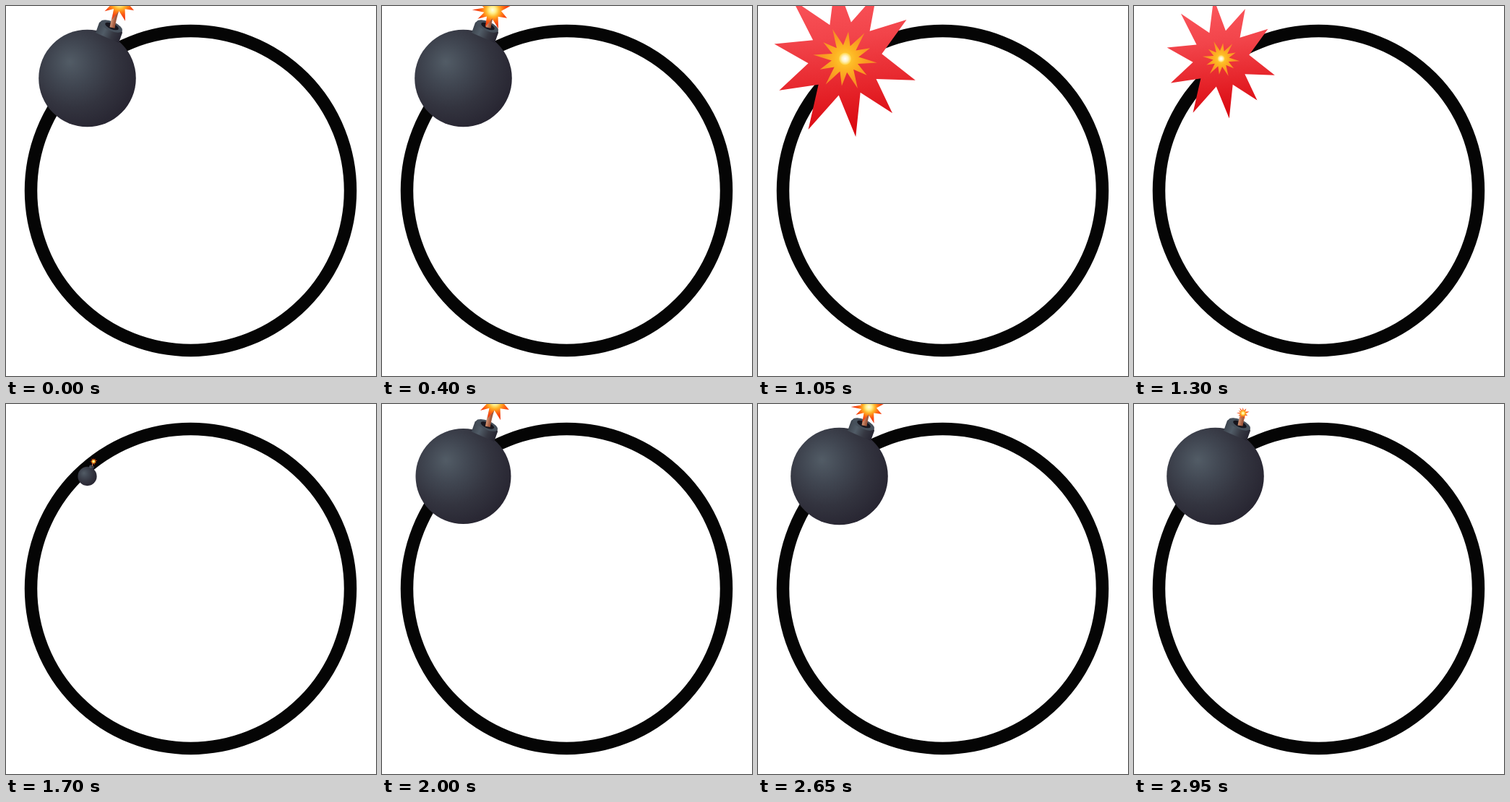
An HTML page with a canvas for the animation above (3000 ms loop, 512 by 512 pixels).

```html
<!DOCTYPE html>
<html lang="en">
<head>
<meta charset="utf-8">
<title>Bomb</title>
<style>
  html, body { margin: 0; width: 100%; height: 100%; overflow: hidden; background: #fff; }
  canvas { display: block; width: 100vw; height: 100vh; }
</style>
</head>
<body>
<canvas id="stage" width="512" height="512"></canvas>
<script>
const ctx = document.getElementById('stage').getContext('2d');
const TAU = Math.PI * 2;
const LOOP = 3000, CYCLE = 2300, STEP = 50;
const IGNITE = 800, PEAK = 950, REBIRTH = 1650, GROWTH = 400;
const BOMB = [112.5, 100], BLAST = [120.5, 73];

const clamp = x => Math.max(0, Math.min(1, x));

function polar(deg, r) {
  const a = deg * TAU / 360;
  return [Math.cos(a) * r, Math.sin(a) * r];
}

// Star from rules for the angle and reach of each tip, with a notch between tips
function star(count, angle, reach, notch) {
  const points = [];
  for (let i = 0; i < count; i++) {
    const next = i + 1 < count ? angle(i + 1) : angle(0) + 360;
    points.push(polar(angle(i), reach(i)), polar((angle(i) + next) / 2, notch));
  }
  return points;
}

const SPARK = star(10, i => 36 * i - 7 + 13 * Math.sin((i - 1) * TAU / 10), i => 25.5 + 3 * Math.cos(i * 2.6), 12);
const SHELL = star(10, i => 17 + 34.6 * i - 4 * Math.sin(i * .72), i => 80 + 5 * Math.cos((i - 2.6) * 1.6), 39);
const CORE = star(12, i => 30 * i + 7, i => i % 2 ? 22 : 26, 11);

function shaded(gradient, ...colors) {
  colors.forEach((color, i) => gradient.addColorStop(i / (colors.length - 1), color));
  return gradient;
}

const glow = (r, ...colors) => shaded(ctx.createRadialGradient(0, 0, 0, 0, 0, r), ...colors);

function polygon(points, fill) {
  ctx.beginPath();
  points.forEach(([x, y]) => ctx.lineTo(x, y));
  ctx.closePath();
  ctx.fillStyle = fill;
  ctx.fill();
}

function ellipse(x, y, rx, ry, tilt, fill) {
  ctx.beginPath();
  ctx.ellipse(x, y, rx, ry, tilt, 0, TAU);
  ctx.fillStyle = fill;
  ctx.fill();
}

function placed([x, y], scale, draw) {
  ctx.save();
  ctx.translate(x, y);
  ctx.scale(scale, scale);
  draw();
  ctx.restore();
}

function ring() {
  ctx.beginPath();
  ctx.arc(255.5, 255.5, 221, 0, TAU);
  ctx.lineWidth = 17.5;
  ctx.strokeStyle = '#050505';
  ctx.stroke();
}

function body() {
  ellipse(...BOMB, 67.3, 67.3, 0,
    shaded(ctx.createRadialGradient(88, 77, 0, 96, 84, 88), '#525c66', '#414752', '#33343f', '#282632'));
}

function neck() {
  polygon([[129, 23], [133, 20], [160, 33], [161, 37], [156, 51], [124, 37]],
    shaded(ctx.createLinearGradient(126, 28, 159, 43), '#3c434d', '#515c67', '#363842', '#272632'));
  ellipse(146, 28, 16, 6.5, .4, '#46505b');
  ellipse(146.5, 28, 10, 4, .4, '#17161e');
}

// Quadratic curve from the tip of the fuse down into the neck
function fusePoint(k) {
  const q = 1 - k, mix = (a, b, c) => q * q * a + 2 * q * k * b + k * k * c;
  return [mix(157, 150.5, 147), mix(-5, 10, 30)];
}

function fuse(burnt) {
  ctx.beginPath();
  for (let i = 0; i <= 10; i++) ctx.lineTo(...fusePoint(burnt + (1 - burnt) * i / 10));
  ctx.lineWidth = 7;
  ctx.strokeStyle = shaded(ctx.createLinearGradient(146, 0, 155, 2), '#a5694e', '#cf9070', '#a0583c');
  ctx.stroke();
}

function bomb(u) {
  const fresh = u > REBIRTH;
  const size = fresh ? Math.sin(clamp((u - REBIRTH) / GROWTH) * TAU / 4) : 1;
  const burnt = fresh ? 0 : u / 1200;
  const beat = fresh ? (CYCLE - u) / 300 : u / 400;
  placed(BOMB, size, () => {
    ctx.translate(-BOMB[0], -BOMB[1]);
    body();
    neck();
    fuse(burnt);
    placed(fusePoint(burnt), .6 + .4 * Math.cos(beat * TAU), () =>
      polygon(SPARK, glow(28, '#fffde4', '#fff08a', '#ffb62a', '#ff7a16', '#f94c12', '#f23c10', '#ec300e')));
  });
}

function blast(u) {
  const rise = clamp((u - IGNITE) / (PEAK - IGNITE)) ** 2;
  const left = 1 - clamp((u - PEAK) / (REBIRTH - PEAK));
  placed(BLAST, 1.42 * rise * Math.sqrt(left), () =>
    polygon(SHELL, shaded(ctx.createLinearGradient(-8, -75, 8, 83), '#fb565c', '#f2444a', '#e6252b', '#d8040c')));
  placed(BLAST, 2 * rise * left, () => {
    polygon(CORE, glow(26, '#ffd23a', '#fdb422', '#f99a22', '#f5822a'));
    ellipse(0, 0, 5, 5, 0, glow(5, '#ffffff', '#fff2c0', '#ffd23a'));
  });
}

function draw(t) {
  const u = t % CYCLE;
  ctx.fillStyle = '#fff';
  ctx.fillRect(0, 0, 512, 512);
  ring();
  if (u < PEAK || u > REBIRTH) bomb(u);
  if (u > IGNITE && u < REBIRTH) blast(u);
}

const start = performance.now();
function tick() {
  const t = (performance.now() - start) % LOOP;
  draw(Math.floor(t / STEP) * STEP);
  requestAnimationFrame(tick);
}
tick();
</script>
</body>
</html>
```
